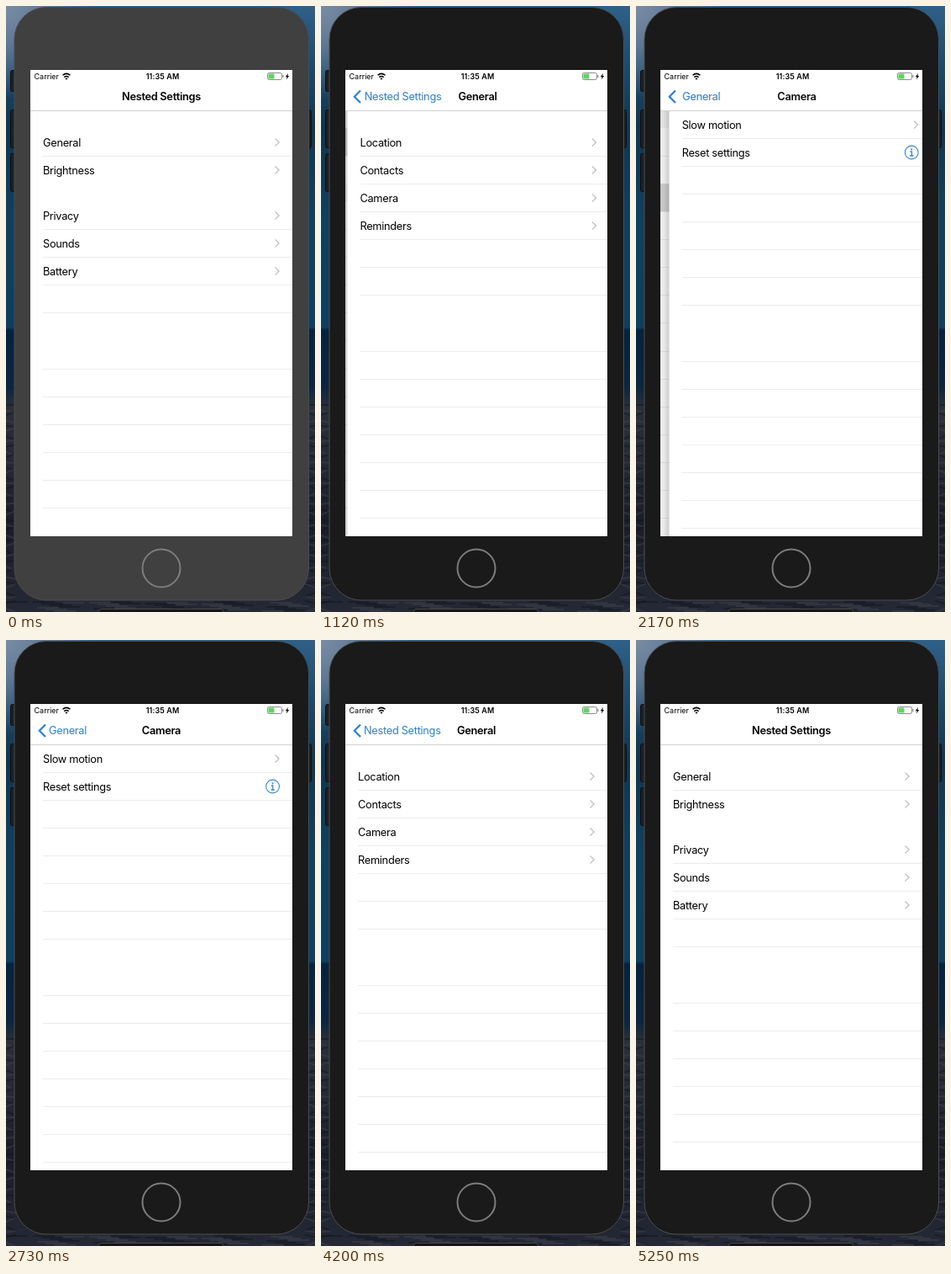
Animation of 368x720 px, one loop 5600 ms. Source, as an HTML page:

```html
<!DOCTYPE html>
<html lang="en">
<head>
<meta charset="utf-8">
<title>Nested settings</title>
<style>
  html, body { margin: 0; width: 100%; height: 100%; overflow: hidden; background: #07192a; }
  svg { display: block; width: 368px; height: 720px; }
  text { font: 12.8px Inter, "Liberation Sans", sans-serif; letter-spacing: -0.3px; fill: #000; }
  .title { font-weight: 600; text-anchor: middle; }
  .back { text-anchor: middle; fill: #2b80d3; }
  .status { font-size: 9px; letter-spacing: 0; }
</style>
</head>
<body>
<svg id="stage" viewBox="0 0 368 720">
  <defs>
    <linearGradient id="sky" x2="0" y2="1">
      <stop offset="0" stop-color="#2f6088"/>
      <stop offset=".1" stop-color="#1c4a6c"/>
      <stop offset=".2" stop-color="#10364f"/>
      <stop offset=".35" stop-color="#10405f"/>
      <stop offset=".53" stop-color="#0e3f60"/>
      <stop offset=".535" stop-color="#06223f"/>
      <stop offset=".63" stop-color="#0c2640"/>
      <stop offset=".66" stop-color="#2a2f39"/>
      <stop offset=".76" stop-color="#242933"/>
      <stop offset=".85" stop-color="#1a1e28"/>
      <stop offset="1" stop-color="#252936"/>
    </linearGradient>
    <radialGradient id="cloud" gradientUnits="userSpaceOnUse" cx="0" cy="0" r="110">
      <stop offset="0" stop-color="#7b8ca4"/>
      <stop offset=".4" stop-color="#6b809b" stop-opacity=".85"/>
      <stop offset="1" stop-color="#6b809b" stop-opacity="0"/>
    </radialGradient>
    <linearGradient id="shade">
      <stop offset="0" stop-color="#000" stop-opacity="0"/>
      <stop offset="1" stop-color="#000" stop-opacity=".13"/>
    </linearGradient>
    <clipPath id="content"><rect x="29" y="125" width="312" height="505"/></clipPath>
    <clipPath id="bar"><rect x="29" y="92" width="312" height="33"/></clipPath>
    <clipPath id="labels"><rect x="41" y="92" width="300" height="33"/></clipPath>
  </defs>

  <rect width="368" height="720" fill="url(#sky)"/>
  <rect width="120" height="120" fill="url(#cloud)"/>
  <g id="rocks" fill="none" stroke-width="2"></g>
  <g fill="#1c2026" stroke="#0b0d10">
    <rect x="5.5" y="76.5" width="8" height="25" rx="2"/>
    <rect x="5.5" y="123.5" width="8" height="45" rx="2"/>
    <rect x="5.5" y="175.5" width="8" height="45" rx="2"/>
    <rect x="355.5" y="123.5" width="8" height="45" rx="2"/>
  </g>
  <rect x="110.5" y="716.5" width="148" height="8" rx="3" fill="#15161a" stroke="#4a4a4a"/>
  <rect id="body" x="10" y="1.5" width="350.5" height="704.5" rx="38" stroke="#4a4c4e"/>
  <circle cx="185" cy="668" r="22.5" fill="none" stroke="#7d7d7d" stroke-width="2"/>

  <rect x="29" y="76" width="312" height="554" fill="#fff"/>
  <g id="screens" clip-path="url(#content)"></g>
  <g clip-path="url(#bar)">
    <g id="titles" clip-path="url(#labels)"></g>
    <path id="chevron" d="M47 100.5L39.8 107.8L47 115.1" fill="none" stroke="#2b80d3" stroke-width="2.2"/>
  </g>
  <rect x="29" y="124" width="312" height="1" fill="#d2d2d2"/>

  <text class="status" x="33.5" y="87">Carrier</text>
  <path d="M67.5 82.3Q72 78.5 76.5 82.3M69.3 84.6Q72 82.3 74.7 84.6" fill="none" stroke="#000" stroke-width="1.5"/>
  <path d="M70.4 86L72 87.8L73.6 86Q72 84.9 70.4 86Z"/>
  <text class="status" x="186.5" y="87" style="font-weight:600;text-anchor:middle;letter-spacing:.1px">11:35 AM</text>
  <rect x="311.5" y="79.5" width="17" height="8" rx="1.8" fill="#fff" stroke="#8d8d8d"/>
  <rect x="312.5" y="80.5" width="7" height="6" rx=".6" fill="#5fd55f"/>
  <rect x="329.3" y="82" width="1.2" height="3" fill="#8d8d8d"/>
  <path d="M336 79.8L332.8 84.2H334.7L333.9 87.5L337.2 83H335.3Z"/>
</svg>
<script>
const LOOP = 5600, STEP = 70, LEFT = 29, WIDTH = 312, MID = 185, TOP = 124.2, ROW = 33.1, HEADER = 21;
const PUSHES = [741, 1885], POPS = [4650, 3673], TAPS = [560, 1610];
const byId = id => document.getElementById(id);
const clamp = v => Math.min(1, Math.max(0, v));

function add(parent, tag, attrs, text) {
  const el = document.createElementNS('http://www.w3.org/2000/svg', tag);
  for (const key in attrs) el.setAttribute(key, attrs[key]);
  if (text) el.textContent = text;
  parent.append(el);
  return el;
}

// Uneven dark and light streaks over the rocky shore.
for (let i = 0; i < 40; i++) {
  const y = 474 + i * 6.2, tilt = 5 * Math.sin(i * 2.3);
  add(byId('rocks'), 'path', {
    d: `M0 ${y}l12 ${tilt}M356 ${y + tilt}l12 ${-tilt}M${(i * 67) % 340} ${708 + i % 12}h26`,
    stroke: i % 2 ? '#40454f' : '#0f131b', opacity: 0.45
  });
}

// Sections of rows; hidden is the separator seen only while the list lies underneath.
const pages = [
  { title: 'Nested Settings', sections: [['General', 'Brightness'], ['Privacy', 'Sounds', 'Battery']], pick: 'General', hidden: 398 },
  { title: 'General', sections: [['Location', 'Contacts', 'Camera', 'Reminders']], pick: 'Camera', hidden: 377 },
  { title: 'Camera', plain: true, sections: [['Slow motion', 'Reset settings']], hidden: 389 }
];

function addAccessory(parent, label, mid) {
  if (label !== 'Reset settings') {
    add(parent, 'path', { d: `M320.5 ${mid - 4.5}l4.6 4.5l-4.6 4.5`, fill: 'none', stroke: '#c4c4c8', 'stroke-width': 1.4 });
    return;
  }
  add(parent, 'circle', { cx: 317.6, cy: mid, r: 7.9, fill: 'none', stroke: '#3b88c8', 'stroke-width': 1.1 });
  add(parent, 'circle', { cx: 317.5, cy: mid - 3.7, r: 1.1, fill: '#3b88c8' });
  add(parent, 'path', { d: `M315.8 ${mid - 1}h2v5M315.5 ${mid + 4}h4.4`, fill: 'none', stroke: '#3b88c8', 'stroke-width': 1.3 });
}

function buildPage(page) {
  const g = page.group = add(byId('screens'), 'g', {});
  page.shadow = add(g, 'rect', { x: LEFT - 7, y: 125, width: 7, height: 505, fill: 'url(#shade)' });
  add(g, 'rect', { x: LEFT, y: 125, width: WIDTH, height: 505, fill: '#fff' });
  page.headers = add(g, 'g', { fill: '#f4f4f4' });
  const line = y => {
    const top = Math.round(y - 0.45);
    const el = add(g, 'rect', { x: 44, y: top, width: 297, height: 1, fill: '#ececec' });
    if (Math.abs(top - page.hidden) < 2) page.extra = el;
  };
  let y = TOP;
  page.sections.forEach((rows, s) => {
    if (!page.plain) {
      add(page.headers, 'rect', { x: LEFT, y: Math.round(y), width: WIDTH, height: HEADER });
      y += HEADER;
    }
    rows.forEach((label, i) => {
      if (label === page.pick)
        page.highlight = add(g, 'rect', { x: LEFT, y: Math.round(y), width: WIDTH, height: 33.5, fill: '#d8d8d8' });
      const mid = Math.round(y + 16.3);
      add(g, 'text', { x: 44, y: mid + 4.7 }, label);
      addAccessory(g, label, mid);
      y += ROW;
      const lastBeforeHeader = i === rows.length - 1 && s < page.sections.length - 1;
      if (!lastBeforeHeader) line(y);
    });
  });
  for (y += ROW; y < 629; y += ROW) line(y);
  page.dim = add(g, 'rect', { x: LEFT, y: 125, width: WIDTH, height: 505 });
  page.name = add(byId('titles'), 'text', { class: 'title', y: 112.3 }, page.title);
  page.back = add(byId('titles'), 'text', { class: 'back', y: 112.3 }, page.title);
  page.backMid = 51 + page.back.getComputedTextLength() / 2;
}
pages.forEach(buildPage);

// Critically damped spring from 0 to 1.
function spring(ms) {
  if (ms <= 0) return 0;
  if (ms > 480) return 1;
  const s = 0.01826 * ms;
  return 1 - (1 + s) * Math.exp(-s);
}

const depth = t => PUSHES.reduce((sum, start, i) => sum + spring(t - start) - spring(t - POPS[i]), 0);

function placePage(page, i, level, navLevel, t) {
  const u = i - level, under = clamp(-u);
  const x = u > 0 ? WIDTH * clamp(u) : -0.3 * WIDTH * under;
  page.group.setAttribute('transform', `translate(${x.toFixed(2)})`);
  page.shadow.setAttribute('opacity', u > 0 && u < 1 ? 1 : 0);
  page.dim.setAttribute('opacity', under * 0.08);
  page.headers.setAttribute('opacity', clamp(under * 8));
  page.extra?.setAttribute('opacity', clamp(under * 3));
  if (page.highlight) {
    const fade = 1 - clamp((t - POPS[i] - 110) / 350);
    page.highlight.setAttribute('opacity', t < TAPS[i] ? 0 : fade);
  }

  const v = i - navLevel, passed = clamp(-v), gone = clamp(-v - 1);
  page.name.setAttribute('x', v > 0 ? MID + 170 * clamp(v) : MID + (page.backMid - MID) * passed);
  page.name.setAttribute('opacity', v > 0 ? 1 - clamp(v) : (1 - passed) ** 0.7);
  page.back.setAttribute('x', MID + (page.backMid - MID) * passed - 115 * gone);
  page.back.setAttribute('opacity', passed * (1 - gone) ** 0.6);
}

function draw(t) {
  const level = depth(t), navLevel = depth(t - 7);
  byId('body').setAttribute('fill', t < TAPS[0] ? '#404040' : '#1a1a1a');
  byId('chevron').setAttribute('opacity', clamp(navLevel));
  pages.forEach((page, i) => placePage(page, i, level, navLevel, t));
}

function tick() {
  const t = performance.now() % LOOP;
  draw(Math.floor(t / STEP) * STEP);
  requestAnimationFrame(tick);
}
tick();
</script>
</body>
</html>
```
